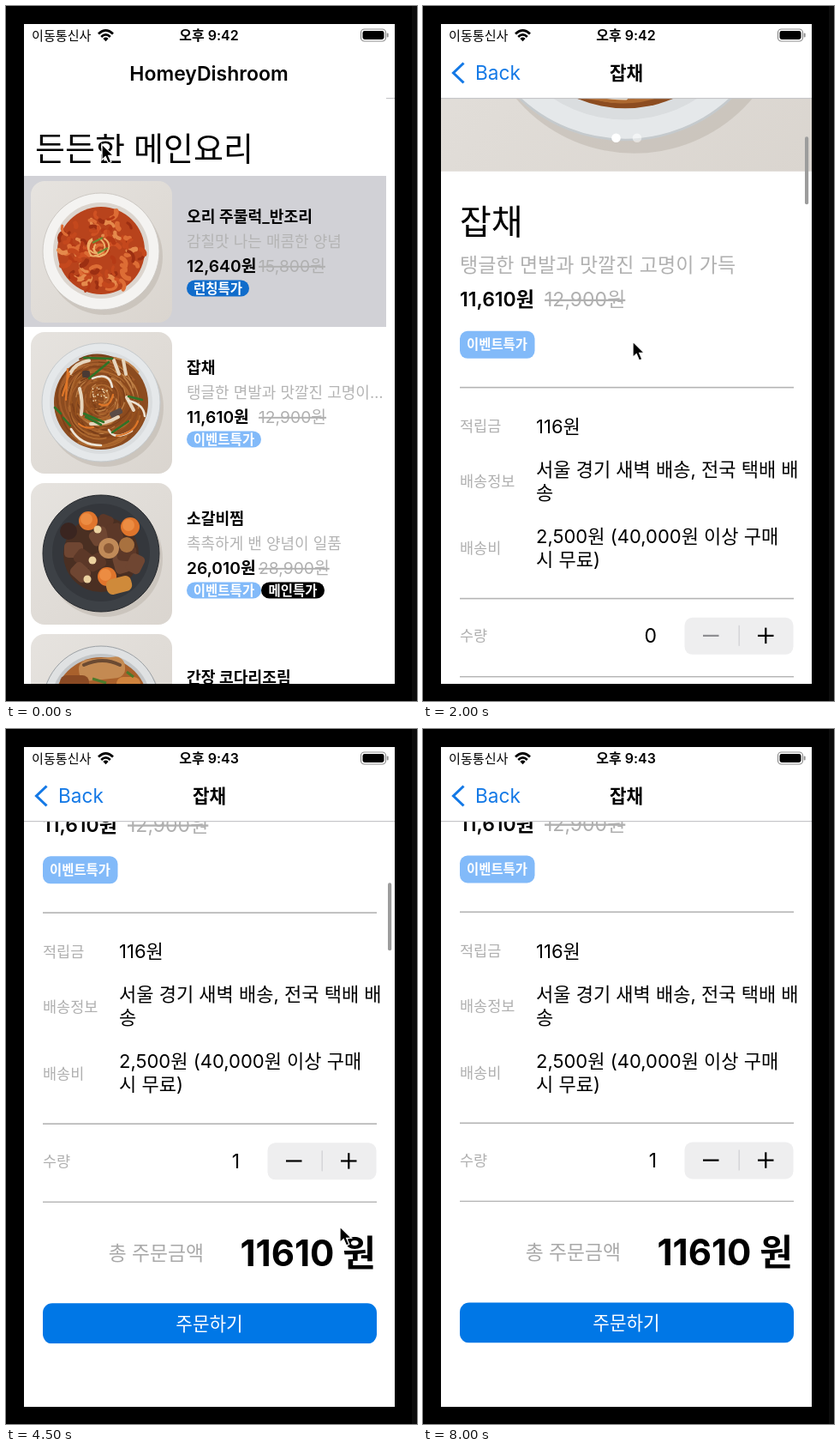
Animation of 480 by 810 pixels, one loop 8100 ms. Source, as an HTML page:

```html
<!DOCTYPE html>
<html lang="ko">
<head>
<meta charset="utf-8">
<title>반찬 주문</title>
<style>
html, body { margin: 0; width: 100%; height: 100%; overflow: hidden; background: #000; }
svg { display: block; width: 100vw; height: 100vh; }
text { font-family: Inter, "Noto Sans CJK KR", "Noto Sans CJK", "Noto Sans KR", sans-serif; white-space: pre; }
.old { text-decoration: line-through; }

@property --y { syntax: "<number>"; inherits: true; initial-value: 447; }

.list, .detail, .scroll, .home, .back, .name, .row1, .row2, .bar, .before, .after,
.tintS, .tintF, .order, .dim, .alert, .cursor, .ring { animation: 8.1s infinite both; }

.list { animation-name: list; }
.detail { animation-name: detail; }
.scroll { animation-name: scroll; }
.content { transform: translateY(calc(var(--y) * 1px)); }
.thumb { transform: translateY(calc(var(--y) * -.117px)); }
.bar { animation-name: bar; }
.home { animation-name: home; }
.back { animation-name: back; }
.name { animation-name: name; }
.row1 { animation-name: row1; }
.row2 { animation-name: row2; }
.before { animation-name: before; animation-timing-function: step-end; }
.after { animation-name: after; animation-timing-function: step-end; }
.tintS { animation-name: tintS; }
.tintF { animation-name: tintF; }
.order { animation-name: order; }
.dim, .alert { animation-name: alert; }
.cursor { animation-name: cursor; animation-timing-function: ease-in-out; }
.ring { animation-name: ring; animation-timing-function: step-end; }

@keyframes list {
  0%, 1.2% { transform: none; }
  3% { transform: translateX(3px); }
  9.9% { transform: translateX(3px); animation-timing-function: cubic-bezier(.2,.7,.2,1); }
  16%, 100% { transform: translateX(-127px); }
}
@keyframes detail {
  0%, 1.2% { transform: translateX(423px); }
  3% { transform: translateX(436px); }
  9.9% { transform: translateX(436px); animation-timing-function: cubic-bezier(.2,.7,.2,1); }
  16%, 100% { transform: none; }
}
@keyframes scroll {
  0%, 3% { --y: 0; }
  3.01% { --y: 447; }
  17.9% { --y: 447; animation-timing-function: linear; }
  19.6% { --y: 388; }
  20.9% { --y: 388; animation-timing-function: linear; }
  22.3% { --y: 171; animation-timing-function: cubic-bezier(.25,.46,.65,.84); }
  30.8% { --y: 0; }
  31.2% { --y: 0; animation-timing-function: cubic-bezier(.25,.53,.6,.9); }
  41.9% { --y: -47.5; }
  48.8% { --y: -47.5; animation-timing-function: linear; }
  53.1% { --y: -118; animation-timing-function: ease-out; }
  56.2%, 100% { --y: -131.5; }
}
@keyframes bar { 0%, 17.5% { opacity: 0; } 18.6%, 69% { opacity: 1; } 72%, 100% { opacity: 0; } }
@keyframes home {
  0%, 9.9% { opacity: 1; transform: none; }
  14%, 100% { opacity: 0; transform: translateX(-130px); }
}
@keyframes back { 0%, 10.5% { opacity: 0; } 15.5%, 100% { opacity: 1; } }
@keyframes name {
  0%, 9.9% { opacity: 0; transform: translateX(190px); animation-timing-function: cubic-bezier(.2,.7,.2,1); }
  16%, 100% { opacity: 1; transform: none; }
}
@keyframes row1 { 0%, 1.2% { opacity: 1; } 5%, 100% { opacity: 0; } }
@keyframes row2 { 0%, 8.4% { opacity: 0; } 8.8%, 16% { opacity: 1; } 16.5%, 100% { opacity: 0; } }
@keyframes before { 0% { opacity: 1; } 44.2%, 100% { opacity: 0; } }
@keyframes after { 0% { opacity: 0; } 44.2%, 100% { opacity: 1; } }
@keyframes tintS { 0%, 72.8%, 89%, 100% { stroke: #1479e6; } 75.9%, 86.2% { stroke: #8f96a5; } }
@keyframes tintF { 0%, 72.8%, 89%, 100% { fill: #1479e6; } 75.9%, 86.2% { fill: #8f96a5; } }
@keyframes order { 0%, 72.8%, 89%, 100% { fill: #fff; } 75.9%, 86.2% { fill: #2b6db0; } }
@keyframes alert {
  0%, 72.8% { opacity: 0; }
  75.9%, 84% { opacity: 1; }
  85.1%, 86.2% { opacity: .84; }
  88.5%, 100% { opacity: 0; }
}
@keyframes cursor {
  0%, 1.2% { transform: translate(112px, 161px); }
  7.4%, 12.3% { transform: translate(250px, 465px); }
  17.9% { transform: translate(250px, 620px); animation-timing-function: linear; }
  19.6% { transform: translate(250px, 561px); }
  20.9% { transform: translate(250px, 561px); animation-timing-function: linear; }
  22.3% { transform: translate(250px, 345px); }
  30.8%, 31.9% { transform: translate(220px, 622px); }
  40.7%, 46.5% { transform: translate(405px, 585px); }
  48.8% { transform: translate(392px, 650px); animation-timing-function: linear; }
  53.1%, 56.8% { transform: translate(390px, 580px); }
  65.4%, 74% { transform: translate(238px, 692px); }
  82.7%, 86.4% { transform: translate(274px, 463px); }
  96.3%, 100% { transform: translate(300px, 835px); }
}
@keyframes ring {
  0% { opacity: 0; }
  8% { opacity: 1; } 9.2% { opacity: 0; }
  17.9% { opacity: 1; } 22.3% { opacity: 0; }
  43.2% { opacity: 1; } 45% { opacity: 0; }
  48.8% { opacity: 1; } 53.1% { opacity: 0; }
  68% { opacity: 1; } 69.5% { opacity: 0; }
  82.7% { opacity: 1; } 84.1%, 100% { opacity: 0; }
}
</style>
</head>
<body>
<script>
const GREY = '#b0b0b0', LIGHT = '#82baf9';
let seed = 11;
const rnd = (a, b) => {
  seed = (seed * 16807) % 2147483647;
  return a + (b - a) * seed / 2147483647;
};
const pick = list => list[Math.floor(rnd(0, list.length))];
const times = (n, fn) => Array.from({ length: n }, (_, i) => fn(i)).join('');

// cy is the vertical middle of the glyphs
const text = (x, cy, size, str, { w = 400, fill = '#000', at = 'start', cls = '' } = {}) =>
  `<text x="${x}" y="${cy + size * .37}" font-size="${size}" font-weight="${w}" fill="${fill}" text-anchor="${at}" class="${cls}">${str}</text>`;
const rect = (x, y, w, h, fill, r = 0, more = '') =>
  `<rect x="${x}" y="${y}" width="${w}" height="${h}" rx="${r}" fill="${fill}" ${more}/>`;
const circle = (x, y, r, fill, more = '') => `<circle cx="${x}" cy="${y}" r="${r}" fill="${fill}" ${more}/>`;
const stroke = (d, color, w, more = '') =>
  `<path d="${d}" fill="none" stroke="${color}" stroke-width="${w}" ${more}/>`;
const round = 'stroke-linecap="round" stroke-linejoin="round"';

// Dishes are drawn on a 165 unit square
const plate = (r, fill, edge) =>
  circle(86, 88, r, '#bdb6ad', 'opacity=".55"') + circle(82, 82, r, fill, `stroke="${edge}" stroke-width="1"`);

function arc(r, a, sweep, cx, cy) {
  const p = t => `${(cx + r * Math.cos(t)).toFixed(1)} ${(cy + r * Math.sin(t)).toFixed(1)}`;
  return `M${p(a)}A${r.toFixed(1)} ${r.toFixed(1)} 0 0 1 ${p(a + sweep)}`;
}

function noodles() {
  const browns = ['#7b3f19', '#98531f', '#ad682f', '#bf8047', '#8d4a1e', '#a45c2a'];
  const strands = times(190, () => stroke(
    arc(rnd(8, 48), rnd(0, 6.28), rnd(.5, 1.6), 82 + rnd(-8, 8), 82 + rnd(-8, 8)), pick(browns), rnd(1.2, 2.2)));
  const swirl = times(9, i => stroke(arc(4 + i * 1.9, rnd(0, 6), 2.8, 83, 75), pick(browns.slice(2)), 1.8));
  const bits = [
    ['#e6d5bd', 4, 'M46 48Q52 36 68 33M57 66Q61 80 59 96M97 33L103 49M70 107Q86 108 102 99M108 33L111 49M112 76L120 91'],
    ['#ece4d6', 2.6, 'M72 54Q92 46 95 64M47 113Q58 132 82 132M114 80Q132 84 133 98M91 114Q97 127 118 115'],
    ['#2f7428', 2.6, 'M62 30L95 31M68 54L91 35M62 95L85 105M64 99L82 108M95 117L114 104M114 75L130 79M28 88L35 95M38 100L46 109'],
    ['#df7628', 2.2, 'M43 43L41 79M45 48L37 74M56 107Q63 113 73 111M100 121Q120 118 125 104M96 73Q92 90 80 84']
  ].map(([c, w, d]) => stroke(d, c, w, round)).join('');
  return plate(69, '#e5e8ea', '#c5cacd') + circle(82, 82, 60, '#dadddf') + circle(82, 82, 55, '#8c4c20') + strands + swirl +
    rect(92, 91, 15, 7, '#5a4b46', 2, 'transform="rotate(-25 99 94)"') + rect(60, 45, 9, 8, '#493a34', 2) + bits +
    times(22, () => circle(81 + rnd(-9, 9), 72 + rnd(-9, 9), .8, '#f3dfb8'));
}

function spicy() {
  const reds = ['#b53a16', '#cf5123', '#dd6d35', '#9c2f12', '#c4481d', '#e58a4c'];
  const meat = times(95, () => {
    const a = rnd(0, 6.28), r = 46 * Math.sqrt(rnd(0, 1));
    return stroke(arc(rnd(4, 9), rnd(0, 6.28), rnd(.8, 1.8), 82 + r * Math.cos(a), 81 + r * Math.sin(a)), pick(reds), rnd(3, 6), round);
  });
  const onion = times(10, () => stroke(arc(rnd(6, 16), rnd(0, 6), 1.6, 78 + rnd(-5, 5), 76 + rnd(-5, 5)), '#eeb06a', 2));
  return plate(68, '#f4f3f1', '#cdc9c4') + circle(82, 81, 56, '#dcd5ce') + circle(82, 81, 51, '#b8431c') + meat + onion +
    stroke('M72 72L84 66M78 84L90 78', '#6b8d34', 2);
}

function stew() {
  const beef = [[50, 78], [62, 88], [106, 94], [86, 48], [80, 62], [112, 82], [58, 104], [98, 58], [122, 94], [76, 92]];
  return plate(68, '#3d4146', '#25282c') + circle(82, 81, 57, '#34373c') + circle(82, 83, 44, '#4a2f22') +
    beef.map(([x, y], i) => rect(x - 11, y - 9, 22, 18, i % 2 ? '#5c3828' : '#6f4632', 5, `transform="rotate(${i * 37} ${x} ${y})"`)).join('') +
    [[67, 44], [116, 51], [89, 109]].map(([x, y]) => circle(x, y, 11, '#e0752c') + circle(x - 2, y - 2, 7, '#ec8c42')).join('') +
    circle(44, 56, 10, '#3a2520') + circle(91, 76, 12, '#c08a58') + circle(91, 76, 6, '#8c5a36') + circle(112, 72, 9, '#a8713f') +
    rect(88, 110, 30, 18, '#cf8a3a', 7, 'transform="rotate(-14 103 119)"') +
    [[72, 90], [78, 54], [66, 112]].map(([x, y]) => circle(x, y, 4.5, '#ecd2a0')).join('');
}

const fish = () => plate(68, '#dfe1e2', '#9ca1a5') + circle(82, 82, 59, '#c3c6c8') + circle(82, 82, 55, '#a9612c') +
  rect(56, 28, 54, 25, '#c48a52', 11, 'transform="rotate(-6 83 40)"') + stroke('M62 36Q84 26 104 36', '#6b4a32', 4, round) +
  rect(34, 48, 34, 18, '#8a4a24', 8) + rect(100, 50, 28, 16, '#d0843e', 8) + stroke('M72 52L88 57M112 44L120 50', '#4d7a2c', 3);

const dishes = [spicy(), noodles(), stew(), fish()];
const japchae = dishes[1];

const rows = [
  ['오리 주물럭_반조리', '감칠맛 나는 매콤한 양념', '12,640원', '15,800원', [['런칭특가', 73, '#106ccb']]],
  ['잡채', '탱글한 면발과 맛깔진 고명이…', '11,610원', '12,900원', [['이벤트특가', 87, LIGHT]]],
  ['소갈비찜', '촉촉하게 밴 양념이 일품', '26,010원', '28,900원', [['이벤트특가', 87, LIGHT], ['메인특가', 74, '#000']]],
  ['간장 코다리조림', '', '', '', []]
];

function row([name, note, price, old, tags], i) {
  let x = 211;
  const pills = tags.map(([label, w, fill]) => {
    const s = rect(x, 319.5, w, 19, fill, 9.5) + text(x + w / 2, 329, 15.5, label, { w: 600, fill: '#fff', at: 'middle' });
    x += w;
    return s;
  }).join('');
  return `<g transform="translate(0 ${i * 176})">` +
    (i < 2 ? rect(18, 198, 437, 176, '#d1d1d6', 0, `class="row${i + 1}"`) : '') +
    `<g transform="translate(29 204)">${rect(0, 0, 165, 165, 'url(#cloth)', 16)}${dishes[i]}</g>` +
    text(211, i == 3 ? 254 : 245.5, 18.2, name, { w: 600 }) + text(211, 274, 18, note, { fill: '#b4b4b4' }) +
    text(211, 303, 19.3, price, { w: 600 }) + text(295, 303, 19.3, old, { fill: GREY, cls: 'old' }) + pills + '</g>';
}

const list = `<g class="list">${rect(18, 21, 570, 769, '#fff')}` +
  text(34, 166, 38, '든든한 메인요리', { w: 500 }) + rows.map(row).join('') + '</g>';

const rule = y => rect(43, y, 390, 1.6, '#b4b4b4');
const label = (y, str) => text(43, y, 17.5, str, { fill: GREY });
const value = (y, str) => text(132, y, 22, str);
const end = { at: 'end' }, mid = { at: 'middle' };

const total = (cls, x, qty, sum) => `<g class="${cls}">` + text(273, 634, 23, qty, end) +
  text(x, 741, 22.8, '총 주문금액', { at: 'end', fill: '#a9a9a9' }) + text(432, 741, 42, sum, { at: 'end', w: 700 }) +
  rect(327, 633, 18.5, 2.2, cls == 'before' ? '#8e8e92' : '#000') + '</g>';

const content = '<g class="content">' +
  `<g transform="translate(21 -340) scale(2.624)">${rect(0, 0, 165, 165, 'url(#cloth)')}${japchae}</g>` +
  circle(225.5, 54, 5.3, '#fff') + circle(250, 54, 5.3, '#fff', 'opacity=".5"') +
  text(43, 151, 40, '잡채', { w: 500 }) +
  text(43, 202, 23, '탱글한 면발과 맛깔진 고명이 가득', { fill: GREY }) +
  text(43, 242, 23, '11,610원', { w: 600 }) + text(142, 242, 23, '12,900원', { fill: GREY, cls: 'old' }) +
  rect(43, 279, 87.5, 32, LIGHT, 9) + text(86.5, 295, 15.4, '이벤트특가', { at: 'middle', w: 600, fill: '#fff' }) +
  rule(344) + label(390, '적립금') + value(390, '116원') +
  label(454, '배송정보') + value(440, '서울 경기 새벽 배송, 전국 택배 배') + value(467, '송') +
  label(532, '배송비') + value(518, '2,500원 (40,000원 이상 구매') + value(545, '시 무료)') +
  rule(590) + label(634, '수량') + rect(305.5, 613, 127, 43, '#eeeeef', 9) + rect(368.5, 622, 1.4, 24, '#d2d2d6') +
  rect(391, 633, 18.5, 2.2, '#000') + rect(399.2, 624.8, 2.2, 18.5, '#000') +
  total('before', 323, '0', '0 원') + total('after', 231, '1', '11610 원') +
  rule(681) + rect(43, 800, 390, 47, '#0077e6', 11) +
  text(237.5, 823.5, 21.3, '주문하기', { at: 'middle', fill: '#fff', cls: 'order' }) + '</g>';

const detail = `<g class="detail"><g class="scroll">${rect(21, 21, 433, 769, '#fff')}${content}` +
  `<g class="bar">${rect(446, 164, 4.2, 79, '#9c9c9c', 2.1, 'class="thumb"')}</g>` +
  rect(21, 21, 433, 86, '#fff') + rect(21, 107, 433, 1.2, '#c6c6c9') + '</g></g>';

const clock = (cls, t) => text(237, 34.5, 16, '오후 ' + t, { at: 'middle', w: 600, cls });
const status = text(30, 34.5, 15.1, '이동통신사', { w: 500 }) + clock('before', '9:42') + clock('after', '9:43') +
  stroke('M108 32.4Q116.500 24.500 125 32.400M111.200 35.900Q116.500 31 121.800 35.900', '#000', 2.7) +
  '<path d="M113.400 38Q116.500 35.200 119.600 38L116.500 41.300Z"/>' +
  rect(414.5, 27, 29, 14, 'none', 4, 'stroke="#8d8d8d" stroke-width="1.2"') + rect(416.5, 29, 25, 10, '#000', 2.4) +
  rect(444.8, 31.5, 1.8, 5, '#8d8d8d', 1);

const nav = text(237, 78, 23, 'HomeyDishroom', { at: 'middle', w: 600, cls: 'home' }) +
  `<g class="back">${stroke('M47.500 66.500L35.500 78L47.500 89.500', '#1479e6', 3.1, 'class="tintS"')}` +
  text(61, 78, 22.6, 'Back', { cls: 'tintF' }) + '</g>' +
  text(237.5, 78, 21.3, '잡채', { at: 'middle', w: 600, cls: 'name' });

const alertBox = rect(21, 21, 433, 769, '#000', 0, 'fill-opacity=".2" class="dim"') +
  `<g class="alert">${rect(55, 334, 365.5, 170, '#f3f3f3', 18)}` +
  text(237.5, 375, 21.3, '성공', { at: 'middle', w: 600 }) + text(237.5, 405, 16.8, '주문 완료!', mid) +
  rect(55, 443.5, 365.5, 1, '#b9b9bc') + text(234, 473.5, 21.7, '알겠어요', { at: 'middle', fill: '#1a82f0' }) + '</g>';

const cursor = `<g class="cursor">${circle(-.5, .5, 29.3, 'none', 'stroke="#000" stroke-width="2" class="ring"')}` +
  '<path d="M0 0V18.500L4.200 14.600L7.400 22L10.800 20.600L7.700 13.400H13.400Z" stroke="#fff" stroke-width="1.300"/></g>';

document.body.innerHTML = `<svg viewBox="0 0 480 810" preserveAspectRatio="none">
<defs>
  <clipPath id="screen"><rect x="21" y="21" width="433" height="769"/></clipPath>
  <linearGradient id="cloth" x2="1" y2="1"><stop stop-color="#e6e3df"/><stop offset="1" stop-color="#dad5cf"/></linearGradient>
</defs>
${rect(0, 0, 480, 810, '#000')}${rect(474, 0, 6, 810, '#0c0c0c')}
<g clip-path="url(#screen)">${list}${detail}${status}${nav}${alertBox}</g>
${cursor}
</svg>`;
</script>
</body>
</html>
```
